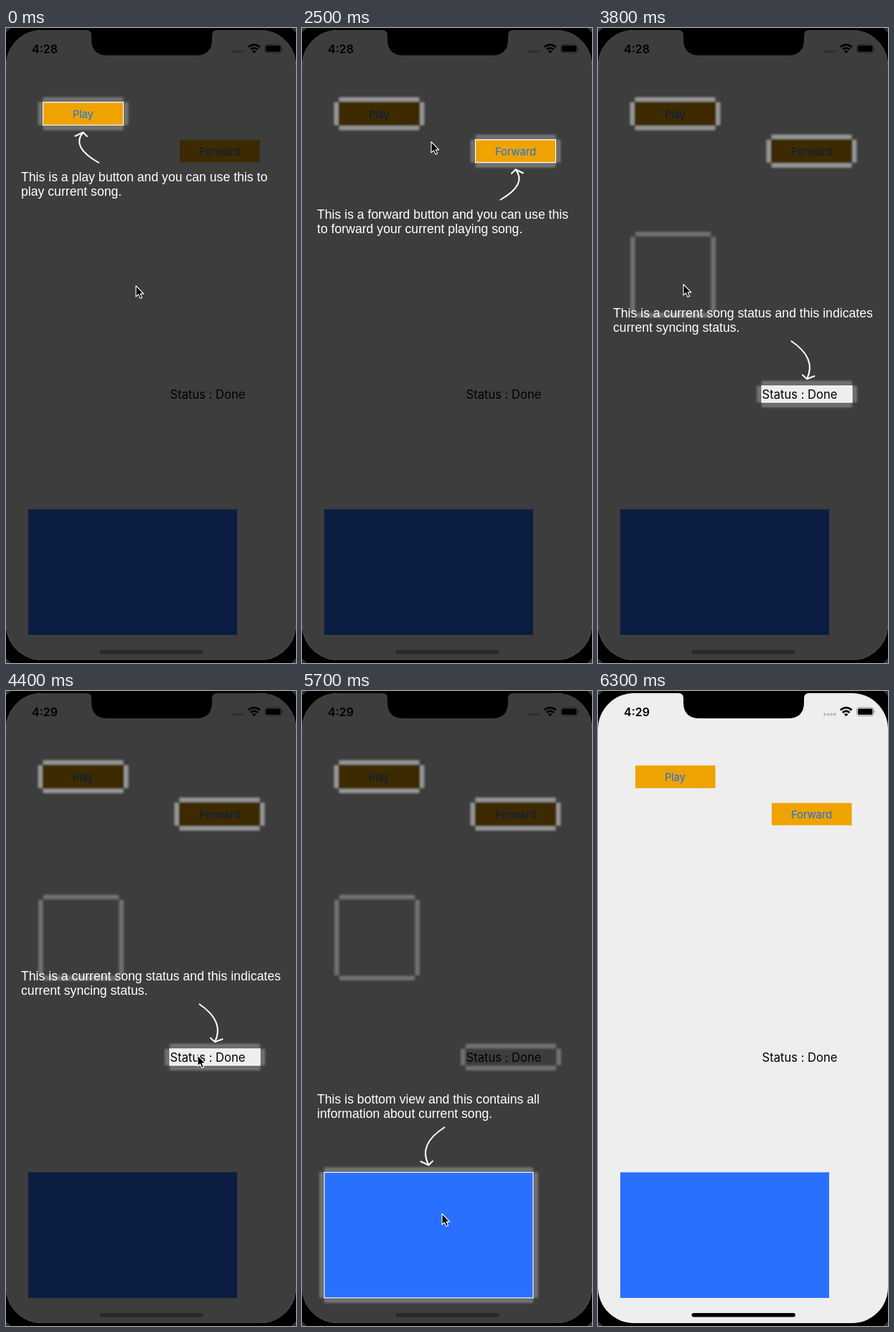
An HTML page that plays this animation: 404x882 px, repeating every 6.9 s.

```html
<!DOCTYPE html>
<html lang="en">
<head>
<meta charset="utf-8">
<title>Button tour</title>
<style>
  html, body { margin: 0; width: 100%; height: 100%; overflow: hidden; background: #333; }
  svg { display: block; width: 404px; height: 882px; }
  .ui { font-family: Inter, Roboto, sans-serif; }
  .tip { font: 17.65px "Liberation Sans", Arial, sans-serif; fill: #fff; }
</style>
</head>
<body>
<svg viewBox="0 0 404 882">
  <defs>
    <filter id="blur" filterUnits="userSpaceOnUse" x="0" y="0" width="404" height="882">
      <feGaussianBlur stdDeviation="1.7"/>
    </filter>
    <clipPath id="outside"><path id="cut" clip-rule="evenodd"/></clipPath>
    <clipPath id="screen"><rect y="3" width="404" height="875" rx="50"/></clipPath>
  </defs>
  <rect x="-18" y="-16" width="440" height="914" rx="69"/>
  <g clip-path="url(#screen)">
    <rect width="404" height="882" fill="#eee"/>
    <g class="ui">
      <g fill="#eea300">
        <rect x="52" y="103.5" width="111.5" height="31.5"/>
        <rect x="242" y="155.5" width="111.5" height="31"/>
      </g>
      <g fill="#1a73e8" font-size="15" letter-spacing="-.2" text-anchor="middle">
        <text x="107.3" y="125">Play</text>
        <text x="297.5" y="176.5">Forward</text>
      </g>
      <text x="228.5" y="515" font-size="16.6">Status : Done</text>
      <rect x="31" y="668.5" width="291" height="174.5" fill="#2a70ff"/>
    </g>
    <path id="dim" fill="#000" fill-opacity=".74" fill-rule="evenodd"/>
    <rect id="home" x="130.5" y="864" width="144.500" height="5.500" rx="2.750"/>
  </g>
  <path d="M112 0V3Q119 3 119 10V16Q119 38 142 38H264Q287 38 287 16V10Q287 3 294 3V0Z"/>
  <g class="ui" font-weight="600" font-size="16"><text id="clock" x="36" y="34.500"></text></g>
  <g id="dots">
    <circle cx="316" cy="32.500" r="1.900"/><circle cx="321" cy="32.500" r="1.900"/>
    <circle cx="325.500" cy="32.500" r="1.900"/><circle cx="330" cy="32.500" r="1.900"/>
  </g>
  <g fill="none" stroke="#000" stroke-width="2.600">
    <path d="M337.800 26.600Q345.700 19.800 353.600 26.600"/>
    <path d="M340.700 30Q345.700 25.800 350.700 30"/>
  </g>
  <path d="M342.800 32.300Q345.700 30 348.600 32.300L345.700 35.200Z"/>
  <rect x="360.500" y="23" width="23.500" height="11.500" rx="3.500" fill="none" stroke="#000" stroke-opacity=".4"/>
  <rect x="362" y="24.500" width="20.500" height="8.500" rx="2"/>
  <path d="M385 27Q387 28.700 385 30.500Z" fill-opacity=".45"/>
  <g id="glows" stroke="#fff" stroke-width="6.500"></g>
  <g id="tour">
    <rect id="edge" fill="none" stroke="#fff" stroke-width="1.200"/>
    <path id="arrow" fill="none" stroke="#fff" stroke-width="2" stroke-linecap="round" stroke-linejoin="round"/>
    <text class="tip" x="21" id="line1"></text>
    <text class="tip" x="21" id="line2"></text>
  </g>
  <path id="cursor" d="M0 0V15.200L3.500 12L6 17.600L8.600 16.500L6.200 11.100H10.800Z" stroke="#fff" stroke-width="1.100" stroke-linejoin="round"/>
</svg>
<script>
const LOOP = 6900, STEP = 100, END = 6000, GONE = 6200;
const $ = id => document.getElementById(id);

const steps = [
  { at: 0, box: [51.5, 103, 112, 32], used: .46, y: 213,
    text: ['This is a play button and you can use this to', 'play current song.'],
    arrow: 'M129 187Q90 165 107.500 145M96.500 150L107.500 145L113 150.500' },
  { at: 2000, box: [241.5, 155, 112, 32], used: .46, y: 265,
    text: ['This is a forward button and you can use this', 'to forward your current playing song.'],
    arrow: 'M276.500 238.500Q314 217 297.500 196.500M292 202L297.500 196.500L308 201.500' },
  { at: 3000, box: [52, 290, 105, 105], used: .27, y: 473,
    text: ['This is a song image and this shows current', 'song cover.'],
    arrow: 'M126 447Q87 425 104.500 405M93.500 410L104.500 405L110 410.500' },
  { at: 3800, box: [228, 497, 126, 23], used: .27, y: 402,
    text: ['This is a current song status and this indicates', 'current syncing status.'],
    arrow: 'M269.500 435Q305 459 291 487.500M285 482L291 487.500L301.500 483.500' },
  { at: 4600, box: [31, 668.5, 291, 174.5], used: .27, y: 573,
    text: ['This is bottom view and this contains all', 'information about current song.'],
    arrow: 'M198.500 606Q161 630 176.500 658.500M165.500 653.500L176.500 658.500L182 653' }
];

// pointer stops: time, x, y
const path = [
  [0, 181, 358], [200, 169, 333], [300, 169, 333], [900, 113, 119], [1000, 113, 119],
  [1200, 118, 123], [2000, 118, 123], [2300, 165, 152], [2400, 165, 152], [2500, 180, 158],
  [2900, 300, 173], [3100, 300, 173], [3600, 119, 356], [3800, 119, 356],
  [4400, 267, 506], [4600, 267, 506], [5200, 195, 726], [LOOP, 195, 726]
];

const ease = p => p * p * (3 - 2 * p);

function pointer(t) {
  const i = Math.max(1, path.findIndex(p => p[0] >= t));
  const [t0, x0, y0] = path[i - 1], [t1, x1, y1] = path[i];
  const p = ease((t - t0) / (t1 - t0));
  return [x0 + (x1 - x0) * p, y0 + (y1 - y0) * p];
}

function set(el, attrs) {
  for (const k in attrs) el.setAttribute(k, attrs[k]);
}

for (const s of steps) {
  const [x, y, w, h] = s.box, o = 3.7;
  s.glow = document.createElementNS('http://www.w3.org/2000/svg', 'g');
  s.glow.innerHTML = `<path filter="url(#blur)" d="M${x} ${y - o}h${w}M${x} ${y + h + o}h${w}` +
    `M${x - o} ${y}v${h}M${x + w + o} ${y}v${h}"/>`;
  $('glows').append(s.glow);
}

function draw(t) {
  const on = t < END;
  const now = steps.filter(s => s.at <= t).pop();
  const [x, y, w, h] = now.box;
  const hole = `M0 0H404V882H0ZM${x} ${y}h${w}v${h}h${-w}Z`;

  set($('dim'), { d: hole, display: on ? 'inline' : 'none' });
  set($('cut'), { d: hole });
  set($('home'), { fill: on ? '#292929' : '#000' });
  set($('dots'), { fill: on ? '#2c2c2c' : '#b9b9b9' });
  $('clock').textContent = t < 4200 ? '4:28' : '4:29';

  for (const s of steps) {
    const active = s === now;
    set(s.glow, {
      display: on && s.at <= t ? 'inline' : 'none',
      opacity: active ? .28 : s.used,
      'clip-path': active ? 'url(#outside)' : 'none'
    });
  }

  set($('tour'), { display: on ? 'inline' : 'none' });
  set($('edge'), { x, y, width: w, height: h });
  set($('arrow'), { d: now.arrow });
  now.text.forEach((line, i) => {
    const el = $('line' + (i + 1));
    el.textContent = line;
    set(el, { y: now.y + 20 * i });
  });

  set($('cursor'), {
    transform: `translate(${pointer(t)})`,
    display: t < GONE ? 'inline' : 'none'
  });
}

const start = performance.now();
function tick() {
  const t = (performance.now() - start) % LOOP;
  draw(Math.floor(t / STEP) * STEP);
  requestAnimationFrame(tick);
}
tick();
</script>
</body>
</html>
```
